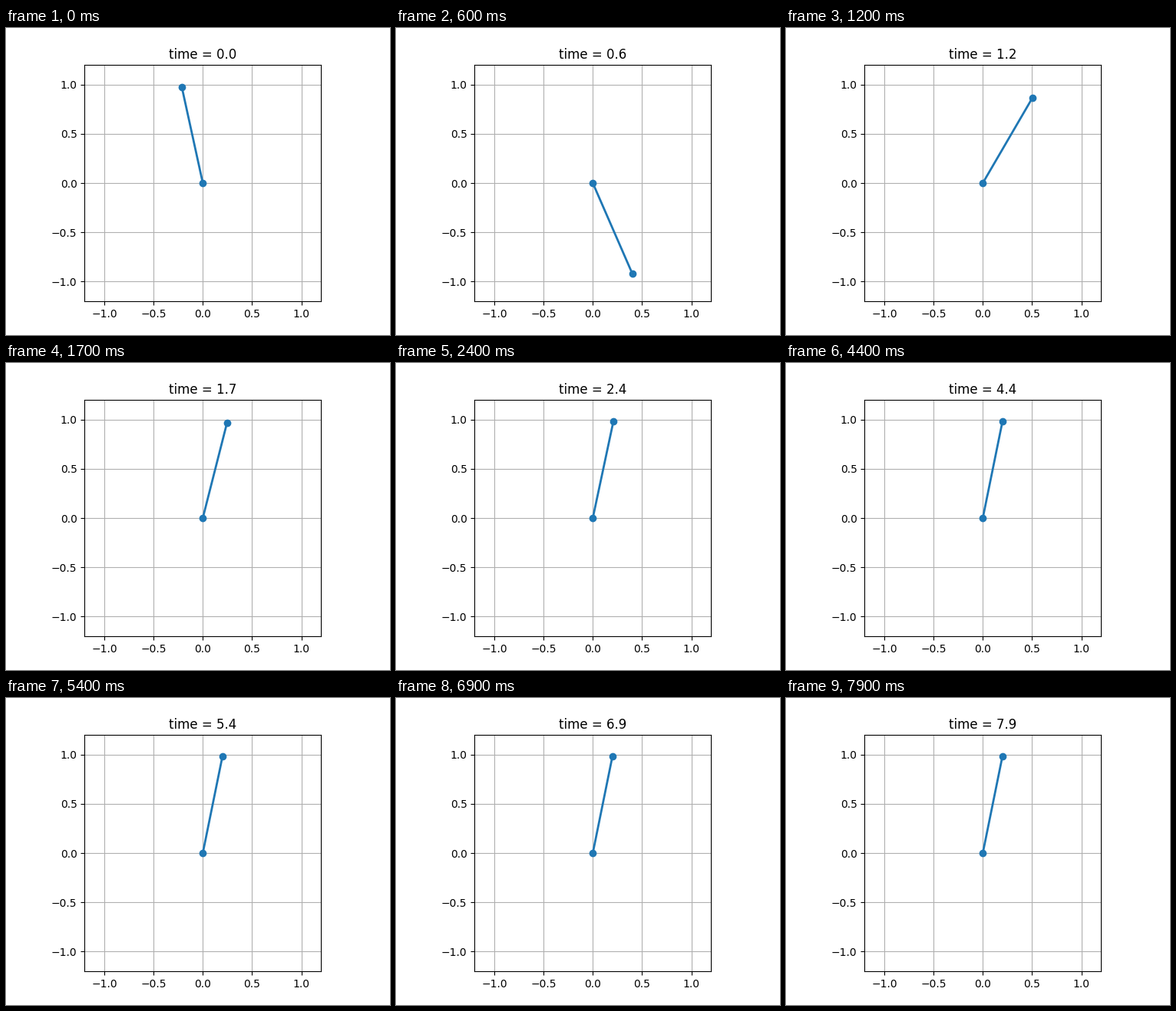
A matplotlib script for the animation above (8 s loop, 500 px wide and 400 px high).

```python
import numpy as np
import matplotlib.pyplot as plt
from matplotlib.animation import FuncAnimation

STEP = 0.1
FRAMES = 80
REST = 0.2                 # final lean from the upright, in radians
SWEEP = 5.868              # angle covered on the way to rest
DAMPING, OMEGA = 2.3, 1.65
SETTLE = 1.2               # from here on the rod only creeps to rest
POWER = 3.5


def spring(t):
    """Offset of a damped spring released from SWEEP, and its speed."""
    decay = SWEEP * np.exp(-DAMPING * t)
    s, c = np.sin(OMEGA * t), np.cos(OMEGA * t)
    offset = decay * (c + DAMPING / OMEGA * s)
    speed = decay * (DAMPING ** 2 + OMEGA ** 2) / OMEGA * s
    return offset, speed


def lean(t):
    """Angle clockwise from the upright at time t."""
    offset, speed = spring(min(t, SETTLE))
    late = max(t - SETTLE, 0)
    return REST + offset * (1 + speed / offset * late / POWER) ** -POWER


fig = plt.figure(figsize=(5, 4), dpi=100)
ax = fig.add_subplot(autoscale_on=False, xlim=(-1.2, 1.2), ylim=(-1.2, 1.2))
ax.set_aspect("equal")
ax.grid()
rod, = ax.plot([], [], "o-", color="C0", lw=2)
title = ax.set_title("")


def update(i):
    t = i * STEP
    a = lean(t)
    rod.set_data([0, np.sin(a)], [0, np.cos(a)])
    title.set_text(f"time = {t:.1f}")
    return rod, title


anim = FuncAnimation(fig, update, frames=FRAMES, interval=1000 * STEP,
                     repeat=True, repeat_delay=0, blit=False)
plt.show()
```
